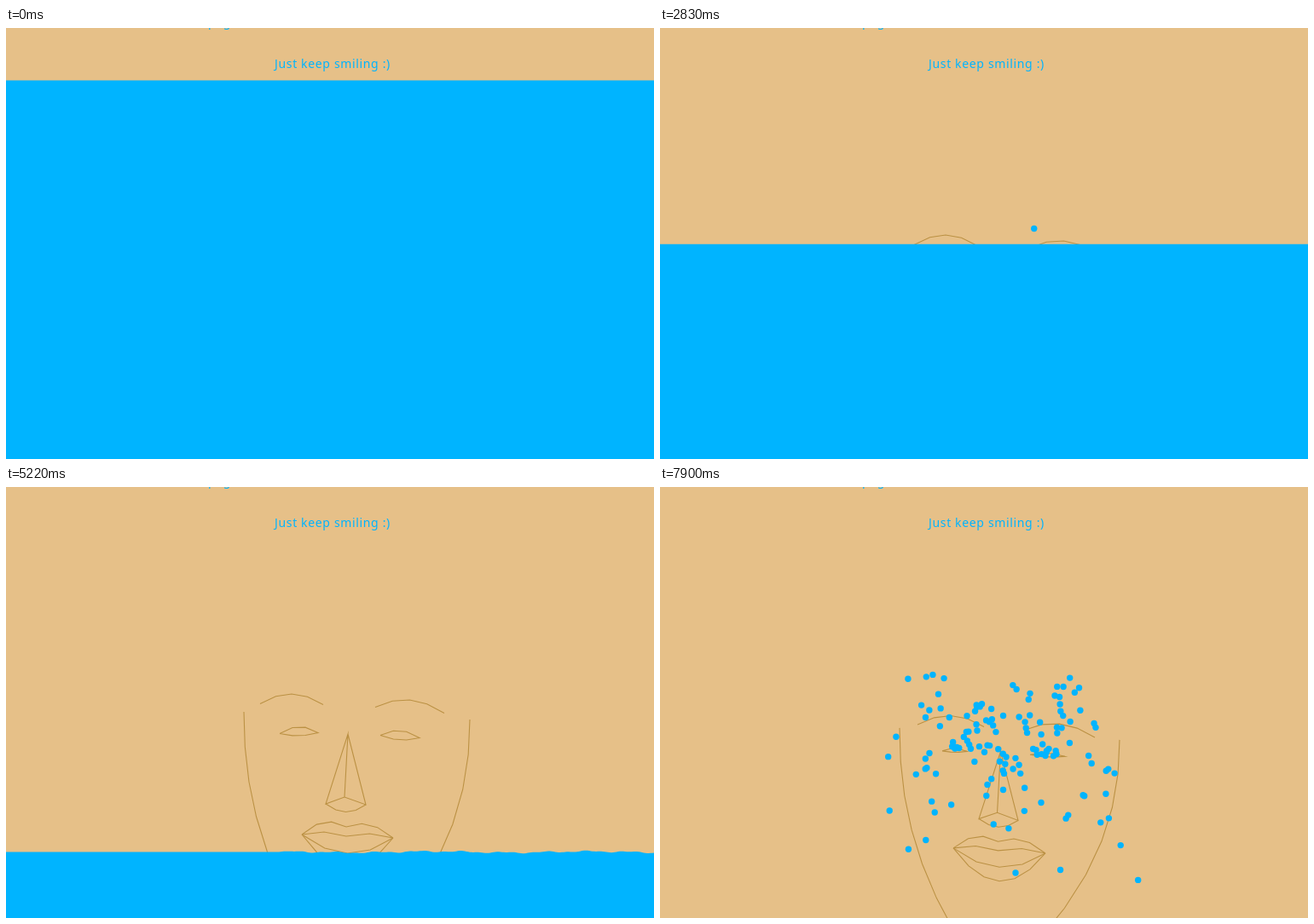
An HTML page with a canvas that plays this animation: 760x506 px, repeating every 8000 ms.

```html
<!DOCTYPE html>
<html lang="en">
<head>
<meta charset="utf-8">
<style>
  html, body { margin: 0; width: 760px; height: 506px; overflow: hidden; background: #e6c088; }
  canvas { display: block; }
</style>
</head>
<body>
<canvas id="stage" width="760" height="506"></canvas>
<script>
const ctx = document.getElementById("stage").getContext("2d");
const LOOP = 8000, STEP = 149;
const WATER = "#00b4ff", SKIN = "#e6c088", LINE = "#bb9144";
const GRAVITY = 400; // px per second squared

const lerp = (a, b, u) => a + (b - a) * u;
const progress = (t, from, to) => Math.min(1, Math.max(0, (t - from) / (to - from)));
const noise = n => { const v = Math.sin(n * 127.1 + 3.7) * 43758.5453; return v - Math.floor(v); };

// Piecewise linear curve through [time, value] keys
function keyed(keys, t) {
  const i = Math.max(1, keys.findIndex(([time]) => t <= time));
  const [t0, v0] = keys[i - 1], [t1, v1] = keys[i];
  return lerp(v0, v1, progress(t, t0, t1));
}

// Parabolic bow between two points, drawn as n straight segments
function bow(x0, y0, x1, y1, bulge, n) {
  return Array.from({ length: n + 1 }, (_, i) => {
    const u = i / n;
    return [lerp(x0, x1, u), lerp(y0, y1, u) - 4 * bulge * u * (1 - u)];
  });
}

// Side of the face, curving in towards the chin
function jaw(x, y, inset) {
  return Array.from({ length: 7 }, (_, i) => {
    const down = i * 41;
    return [x + inset * (down / 229) ** 2.2, y + down];
  });
}

const eye = (x0, y0, x1, y1, upper, lower) =>
  [...bow(x0, y0, x1, y1, upper, 3), ...bow(x0, y0, x1, y1, -lower, 3).reverse()];

const noseTop = [401, 290], noseLeft = [375, 372], noseTip = [397, 364], noseRight = [422, 373];
const mouthLeft = [347, 408], mouthRight = [454, 412];

// drift: sideways move of the part's left and right end when the head sinks
const FACE = [
  { kind: "brow", drift: [4, 8], lines: [bow(298, 257, 372, 258, 12, 4)] },
  { kind: "brow", drift: [-6, -4], lines: [bow(433, 261, 514, 268, 12, 4)] },
  { kind: "eye", drift: [10, -6], lines: [eye(321, 291, 366, 290, 7.5, 3)] },
  { kind: "eye", drift: [-5, -10], lines: [eye(439, 293, 485, 296, 7, 4)] },
  { drift: [-1, -2], lines: [
    [noseTip, noseTop, noseLeft, noseTip, noseRight, noseTop],
    bow(...noseLeft, ...noseRight, -9, 4)] },
  { drift: [-3, -2], lines: [
    [...bow(...mouthLeft, 399, 399, 10, 3), ...bow(399, 399, ...mouthRight, 9, 3)],
    [...bow(...mouthLeft, 399, 410, 4, 2), ...bow(399, 410, ...mouthRight, 4, 2)],
    bow(...mouthLeft, ...mouthRight, -20, 4),
    bow(...mouthLeft, ...mouthRight, -37, 6)] },
  { drift: [2, 0], lines: [jaw(279, 264, 57)] },
  { drift: [-9, -5], lines: [jaw(544, 273, -79)] }
];

function drawFace(t) {
  const early = 1 - progress(t, 5215, 6854), sink = progress(t, 6854, 7897);
  ctx.strokeStyle = LINE;
  ctx.lineWidth = 1.1;
  for (const { kind, drift, lines } of FACE) {
    const xs = lines.flat().map(([x]) => x);
    const left = Math.min(...xs), right = Math.max(...xs);
    const lift = { brow: 2.5, eye: 1.5 }[kind] || 0;
    const middle = lines[0][0][1];
    for (const line of lines) {
      ctx.beginPath();
      for (const [x, y] of line) {
        const shift = lerp(...drift, (x - left) / (right - left));
        let drop = 20.5 - (y - 290) * 0.03 + (x - 400) * 0.02;
        if (kind === "brow") drop += 2.5;
        if (kind === "eye") drop -= (y - middle) * 0.55;
        ctx.lineTo(x + shift * sink, y - lift * early + drop * sink);
      }
      ctx.stroke();
    }
  }
}

const drops = [];

// Tears thrown from both eyes in turn; the flatter the throw, the wider it goes
function addBurst({ count, from, to, eyes, spread, lift }) {
  for (let i = 0; i < count; i++) {
    const random = k => noise(i * 3 + k + count);
    const steep = random(0), [x, y] = eyes[i % 2];
    const side = random(1) < 0.5 ? -1 : 1;
    drops.push({ x, y, born: lerp(from, to, (i + 1) / count),
      vx: side * spread * (1 - 0.5 * steep ** 2) * lerp(0.25, 1, random(2)),
      vy: -lift * steep });
  }
}
addBurst({ count: 24, from: 2250, to: 3350, eyes: [[344, 290], [462, 290]], spread: 230, lift: 260 });
addBurst({ count: 134, from: 6900, to: 7895, eyes: [[350, 307], [452, 316]], spread: 148, lift: 290 });

function drawDrops(t) {
  ctx.fillStyle = WATER;
  for (const { x, y, born, vx, vy } of drops) {
    const age = (t - born) / 1000;
    if (age < 0) continue;
    ctx.beginPath();
    ctx.arc(x + vx * age, y + vy * age + GRAVITY * age * age / 2, 3.7, 0, 2 * Math.PI);
    ctx.fill();
  }
}

const LEVEL = [[0, 61.5], [1937, 205.3], [3725, 321.5], [5215, 428.5], [LOOP, 630]];
const CHOP = [[3280, 0], [3725, 2.5], [4900, 0.7], [LOOP, 0.7]];

function drawWater(t) {
  const level = keyed(LEVEL, t), chop = keyed(CHOP, t);
  const reach = lerp(500, 800, progress(t, 3725, 4900));
  ctx.fillStyle = WATER;
  ctx.beginPath();
  ctx.moveTo(0, 560);
  for (let x = 0; x <= 760; x += 2) {
    const within = progress(x, 300, 350) * progress(x, reach + 15, reach - 15);
    const wave = Math.sin(x / 3.3) * 0.6 + Math.sin(x / 7.9) + Math.sin(x / 29);
    ctx.lineTo(x, level + chop * within * wave);
  }
  ctx.lineTo(760, 560);
  ctx.fill();
}

function drawText() {
  ctx.fillStyle = WATER;
  ctx.font = '14px "Noto Sans", "Open Sans", sans-serif';
  ctx.letterSpacing = "0.65px";
  ctx.fillText("page", 237, -2);
  ctx.fillText("Just keep smiling :)", 315, 47);
}

function draw(now) {
  const t = Math.floor((now % LOOP) / STEP) * STEP;
  ctx.fillStyle = SKIN;
  ctx.fillRect(0, 0, 760, 506);
  drawText();
  drawFace(t);
  drawDrops(t);
  drawWater(t);
}

let start;
function tick(now) {
  start ??= now;
  draw(now - start);
  requestAnimationFrame(tick);
}
requestAnimationFrame(tick);
</script>
</body>
</html>
```
